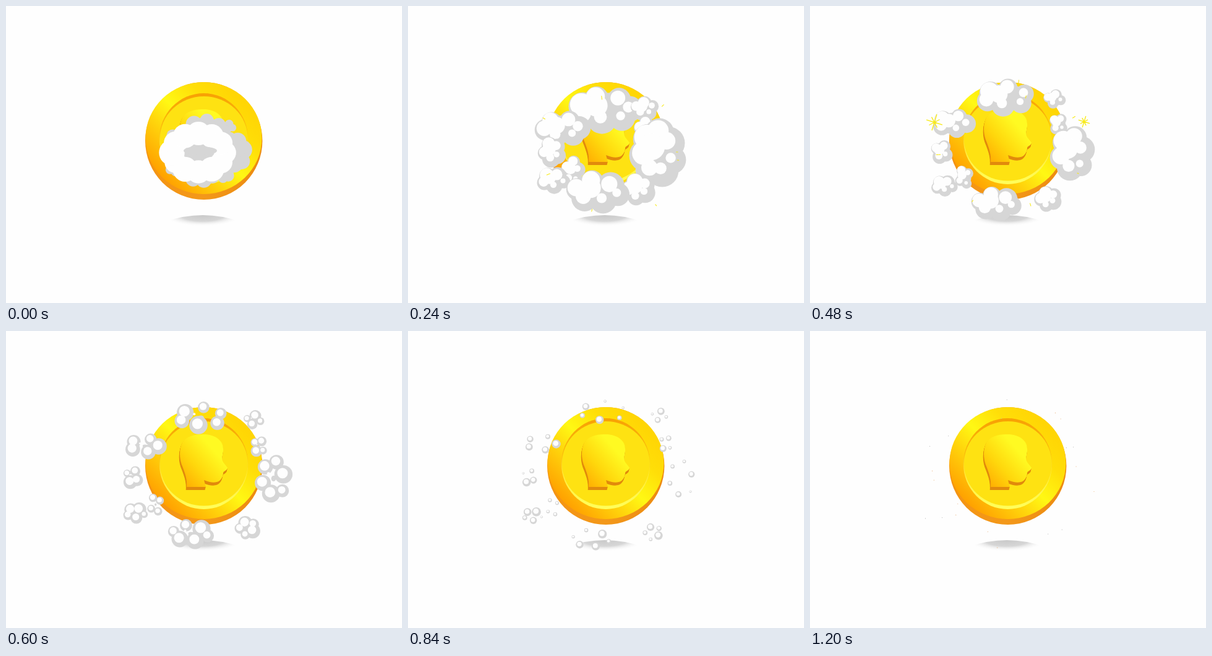
Recreate the animation shown at these times as an HTML page with a canvas. Size 640 by 480 pixels, loop 1320 ms.

```html
<!DOCTYPE html>
<html lang="en">
<head>
<meta charset="utf-8">
<title>Coin and smoke</title>
<style>
html, body { margin: 0; width: 100%; height: 100%; overflow: hidden; background: #fefefe; }
canvas { display: block; width: 640px; height: 480px; }
</style>
</head>
<body>
<canvas id="stage" width="640" height="480"></canvas>
<script>
const ctx = document.getElementById('stage').getContext('2d');
const LOOP = 1320, TAU = Math.PI * 2;
const WHITE = '#fefefe', GREY = '#d6d6d6', SPARK = '#f8ea18';
const MID = { x: 326, y: 236 };
const OPEN = 240, RING = 360, SPLIT = 480, BREAK = 720, BUBBLES = 960, SPECKS = 1080;

// Smoke clumps when the ring is full: centre and half size
const clumps = [
  [317, 158, 55, 35], [389, 158, 21, 18],
  [241, 194, 41, 27], [223, 236, 21, 23],
  [393, 196, 18, 21], [414, 238, 42, 51],
  [379, 304, 26, 24], [258, 272, 18, 23],
  [226, 286, 25, 20], [304, 310, 47, 32]
];
// Large sparkles: x, y, size, peak time
const stars = [[320, 325, 20, 360], [201, 188, 13, 480], [443, 187, 9, 480]];

const mix = (a, b, k) => a + (b - a) * k;
const clamp = v => Math.max(0, Math.min(1, v));
const ramp = (t, from, to) => clamp((t - from) / (to - from));
const rand = n => {
  const v = Math.sin(n * 127.1 + 31.7) * 43758.5453;
  return v - Math.floor(v);
};

// Held poses: 60 ms each, 120 ms at the start and the end
function stepTime(t) {
  if (t < 120) return 0;
  return t < 840 ? Math.floor(t / 60) * 60 : Math.max(840, Math.floor(t / 120) * 120);
}

function oval(x, y, rx, ry, fill) {
  ctx.fillStyle = fill;
  ctx.beginPath();
  ctx.ellipse(x, y, rx, ry, 0, 0, TAU);
  ctx.fill();
}
const dot = (x, y, r, fill) => oval(x, y, r, r, fill);

function blend(x1, y1, x2, y2, ...stops) {
  const g = ctx.createLinearGradient(x1, y1, x2, y2);
  stops.forEach(([at, color]) => g.addColorStop(at, color));
  return g;
}

const rimFill = blend(225, 0, 415, 0, [0, '#f49412'], [.5, '#f3981a'], [1, '#ec8a10']);
const faceFill = blend(254, 279, 386, 147, [0, '#ffa000'], [.5, '#fff814'], [.75, '#ffde08'], [1, '#ffd404']);
const dishFill = blend(0, 141, 0, 288, [0, '#f8a004'], [.4, '#f9bc0c'], [.6, '#ffe93a'], [1, '#ffff5c']);
const headFill = blend(288, 256, 346, 204, [0, '#ffa800'], [.5, '#ffd70c'], [1, '#fffa22']);
const head = new Path2D('M317 167C336 166 351 176 351 190C352 198 347 205 351 212L358 221' +
  'C358 225 352 226 351 229C351 233 350 236 347 240C343 246 332 246 320 241L323 252H292' +
  'C293 240 290 232 286 221C279 206 280 190 285 180C291 171 303 167 317 167Z');
const shade = new Path2D('M256 349Q318 327 380 349Q318 362 256 349Z');

function drawShadow() {
  ctx.save();
  ctx.clip(shade);
  ctx.translate(318, 338);
  ctx.scale(1, .28);
  const g = ctx.createRadialGradient(0, 0, 0, 0, 0, 64);
  g.addColorStop(0, '#c9c9c9');
  g.addColorStop(.55, '#d6d6d6');
  g.addColorStop(1, 'rgba(254,254,254,0)');
  dot(0, 0, 64, g);
  ctx.restore();
}

function drawCoin() {
  oval(319.7, 218, 94.7, 95, rimFill);
  oval(319.5, 213.5, 94, 90.5, faceFill);
  oval(319.5, 214.5, 71.7, 73.5, dishFill);
  oval(319.8, 214.3, 71, 68.3, '#fee212');
  ctx.fillStyle = '#e18a0c';
  for (let k = 5; k > 0; k--) {
    ctx.save();
    ctx.translate(-k * .25, k);
    ctx.fill(head);
    ctx.restore();
  }
  ctx.fillStyle = headFill;
  ctx.fill(head);
}

// Clumps push out from the middle and shrink as the ring opens
function place([x, y, w, h], t) {
  const out = (Math.max(t, OPEN) - RING) / 12;
  const drift = t <= SPLIT ? out : mix(10, 30, 1 - (1 - ramp(t, SPLIT, 1200)) ** 3);
  const size = mix(1.11, .88, ramp(t, OPEN, SPLIT));
  const grow = mix(.58, 1, 1 - (1 - ramp(t, 0, OPEN)) ** 1.6);
  const dx = x - MID.x, dy = y - MID.y, d = Math.hypot(dx, dy);
  const k = (1 + drift / d) * grow;
  return { x: MID.x + dx * k, y: MID.y + dy * k, w: w * size * grow, h: h * size * grow };
}

// Puffs sit around the clump's edge and end up as separate droplets
function puffsOf(clump, seed, t) {
  const { x, y, w, h } = place(clump, t);
  const n = 3 + Math.round((w + h) / 26 / (t < OPEN ? .7 : 1));
  const loose = ramp(t, SPLIT, BREAK);
  return Array.from({ length: n }, (_, j) => {
    const a = j * TAU / n + seed * 1.7;
    const u = rand(seed * 17 + j);
    const full = Math.min(w, h) * mix(.48, .64, u);
    const r = mix(full, 3 + 9 * u, loose) * (1 - ramp(t, BREAK, 1040));
    const spread = mix(1, 1.1, loose);
    return { a, r, x: x + Math.cos(a) * (w - full) * spread, y: y + Math.sin(a) * (h - full) * spread };
  });
}

function drawClump(clump, i, t) {
  const body = place(clump, t), puffs = puffsOf(clump, i + 1, t);
  const thick = 1 - ramp(t, SPLIT, 620);
  if (thick > 0) oval(body.x, body.y, body.w * .72 * thick, body.h * .72 * thick, GREY);
  puffs.forEach(p => dot(p.x, p.y, p.r, GREY));
  if (t < 120) return;
  for (const p of puffs) {
    // Light from the upper left
    const lit = mix(.6, .58 - .24 * Math.cos(p.a - TAU / 8), thick);
    dot(p.x - p.r * .1, p.y - p.r * .14, p.r * lit, WHITE);
  }
  const core = Math.min(body.w, body.h) * .46 * thick;
  oval(body.x - body.w * .22, body.y - body.h * .18, core, core, WHITE);
}

// White wreath on the first, compact cloud
function drawWreath() {
  oval(316, 236, 46, 32, GREY);
  for (let j = 0; j < 12; j++) {
    const a = j * TAU / 12;
    dot(311 + Math.cos(a) * 43, 237 + Math.sin(a) * 31, 17 + 5 * rand(j + 3), WHITE);
  }
  oval(314, 234, 27, 7, GREY);
}

function drawBits(t) {
  clumps.forEach((clump, i) => puffsOf(clump, i + 1, t).forEach((p, j) => {
    if (t >= SPECKS) {
      if (j % 3 === 0) dot(p.x, p.y, t < 1200 ? .9 : .6, i % 2 ? '#e8b07c' : '#b8b8b8');
      return;
    }
    dot(p.x, p.y, p.r, WHITE);
    ctx.strokeStyle = 'rgba(236,150,90,.5)';
    ctx.lineWidth = .6;
    ctx.stroke();
  }));
}

function drawSmoke(t) {
  if (t >= BUBBLES) return drawBits(t);
  clumps.forEach((clump, i) => drawClump(clump, i, t));
  if (t < 120) drawWreath();
}

function drawSpark(x, y, size, rays, turn) {
  ctx.lineWidth = size > 8 ? 1.4 : 1.1;
  ctx.beginPath();
  for (let j = 0; j < rays; j++) {
    const a = turn + j * TAU / rays, len = size * (j % 2 ? .7 : 1);
    ctx.moveTo(x, y);
    ctx.lineTo(x + Math.cos(a) * len, y + Math.sin(a) * len);
  }
  ctx.stroke();
}

function drawSparks(t) {
  const glow = peak => Math.max(0, 1 - Math.abs(t - peak) / 115);
  ctx.strokeStyle = SPARK;
  ctx.lineCap = 'round';
  for (const [x, y, size, peak] of stars) {
    if (glow(peak)) drawSpark(x, y, size * glow(peak), 8, .3);
  }
  for (let i = 0; i < 24; i++) {
    const peak = OPEN + (i % 3) * 120, k = glow(peak);
    if (!k) continue;
    const a = i * 2.4, far = mix(.8, 1.05, rand(i + 50));
    drawSpark(MID.x + Math.cos(a) * 125 * far, MID.y + Math.sin(a) * 110 * far, (1 + 3 * rand(i)) * k, 2, a);
  }
}

function render(now) {
  const t = stepTime(now % LOOP);
  ctx.fillStyle = WHITE;
  ctx.fillRect(0, 0, 640, 480);
  drawShadow();
  drawCoin();
  drawSmoke(t);
  drawSparks(t);
}

let start = null;
function tick(now) {
  if (start === null) start = now;
  render(now - start);
  requestAnimationFrame(tick);
}
render(0);
requestAnimationFrame(tick);
</script>
</body>
</html>
```
